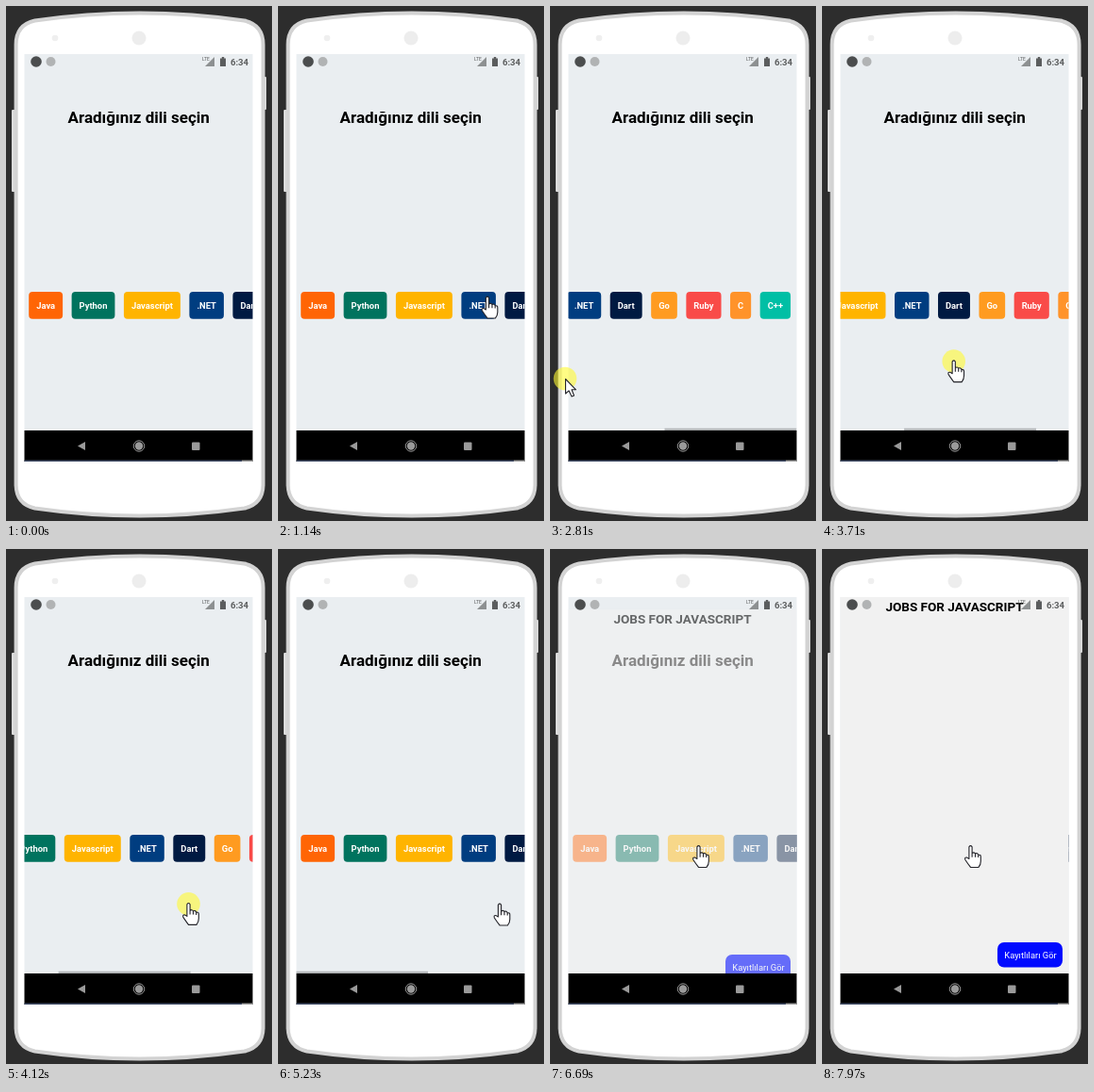
An HTML page for the animation above (8 s loop, 282 by 546 pixels).

```html
<!DOCTYPE html>
<html lang="tr">
<head>
<meta charset="utf-8">
<title>Dil seçimi</title>
<style>
  html, body { margin: 0; width: 100%; height: 100%; overflow: hidden; background: #2d2d2d; }
  svg { display: block; width: 282px; height: 546px; }
  text { font-family: Roboto, sans-serif; text-anchor: middle; }
  .bold { font-weight: 700; }
</style>
</head>
<body>
<svg viewBox="0 0 282 546">
  <defs>
    <clipPath id="app"><rect x="19.500" y="51" width="242" height="399"/></clipPath>
  </defs>

  <rect width="282" height="546" fill="#2d2d2d"/>
  <rect x="6" y="110" width="4" height="87" rx="1" fill="#dcdcdc"/>
  <rect x="272" y="75" width="4" height="35" rx="1" fill="#dcdcdc"/>
  <path transform="translate(.6 -1)" fill="#fff" stroke="#d3d3d3" stroke-width="4"
        d="M10 42Q10 21 30 16.500Q141 .5 252 16.500Q272 21 272 42V508Q272 529 252 533.500Q141 549.500 30 533.500Q10 529 10 508Z"/>
  <circle cx="52" cy="34" r="3.300" fill="#efefef"/>
  <circle cx="141" cy="34" r="7.500" fill="#ededed"/>

  <g clip-path="url(#app)">
    <rect x="19" y="51" width="243" height="399" fill="#eaeef1"/>
    <text class="bold" x="140.700" y="124.300" font-size="17">Aradığınız dili seçin</text>
    <g id="row"></g>
    <rect id="bar" x="19" y="447.700" width="140" height="2.300" fill="#b3b6b8"/>
    <g id="jobs">
      <rect x="19" y="51" width="243" height="440" fill="#f1f1f1"/>
      <text class="bold" x="140.500" y="65.700" font-size="13.500">JOBS FOR JAVASCRIPT</text>
      <rect x="186" y="417" width="69" height="26.500" rx="7" fill="#000aff"/>
      <text x="221" y="434" font-size="9.400" fill="#fff">Kayıtlıları Gör</text>
    </g>
  </g>

  <g fill="#5b5d5e">
    <circle cx="32" cy="59" r="5.800" fill="#4b4d4e"/>
    <circle cx="47.500" cy="59" r="5" fill="#b1b3b4"/>
    <text x="212" y="58" font-size="5">LTE</text>
    <path d="M221 54V64H211Z" fill="#8d9091"/>
    <path d="M227 55.500H228.800V54H231.200V55.500H233V64H227Z"/>
    <text class="bold" x="247.500" y="62.700" font-size="9.600">6:34</text>
  </g>

  <rect x="19.500" y="450" width="242" height="33"/>
  <rect x="19.500" y="481.500" width="230.500" height="1.500" fill="#44506a"/>
  <rect x="250" y="481.500" width="11.500" height="1.500" fill="#a0a0a0"/>
  <g fill="#9a9a9a">
    <path d="M76 466.500L84 462V471Z"/>
    <circle cx="141" cy="466.500" r="4.200"/>
    <circle cx="141" cy="466.500" r="5.700" fill="none" stroke="#9a9a9a"/>
    <rect x="197" y="462.500" width="8.500" height="8.500" rx="1"/>
  </g>

  <g id="cursor" fill="#fff" stroke="#25252b" stroke-linejoin="round">
    <circle id="halo" r="12.300" fill="rgba(255,250,50,.6)" stroke="none"/>
    <path id="hand" transform="translate(0 -.6) scale(.94)" stroke-width="1.200"
          d="M-1.700 1Q0-1.500 1.700 1V8Q4 6.500 5.300 8.500Q8 7.500 8.700 10Q11.500 9.500 11.500 12V17Q11.500 21 9 24H0Q-3 20-6 15.500Q-7 12.500-4 13L-1.700 14.500ZM1.700 8V12.500M5.300 8.500V12.500M8.700 10V13"/>
    <path id="arrow" stroke-width="1.100" d="M.5.500V16L4 12.800L7 19L9.500 18L7 11.800H11.500Z"/>
  </g>
</svg>

<script>
const LOOP = 8000, STEP = 100, MAX_SCROLL = 176.7;
const $ = id => document.getElementById(id);
const [row, bar, jobs, cursor, halo, hand, arrow] =
  ['row', 'bar', 'jobs', 'cursor', 'halo', 'hand', 'arrow'].map($);

const langs = {
  Java: '#ff6505', Python: '#00735e', Javascript: '#ffb400', '.NET': '#003d80',
  Dart: '#001a42', Go: '#ff9b20', Ruby: '#f94b48', C: '#ff932a', 'C++': '#00bfa5'
};
const PAD = 8, GAP = 9.5;
row.innerHTML = Object.entries(langs).map(([name, color]) =>
  `<g><rect y="303" height="28.800" rx="4" fill="${color}"/>
   <text class="bold" y="321" font-size="9.400" fill="#fff">${name}</text></g>`
).join('');

// each button is as wide as its label plus padding
let left = 24.2;
for (const { children: [box, label] } of row.children) {
  const w = label.getComputedTextLength() + 2 * PAD;
  box.setAttribute('x', left);
  box.setAttribute('width', w);
  label.setAttribute('x', left + w / 2);
  left += w + GAP;
}
const picked = row.children[2];

const ramp = (t, from, to) => Math.min(1, Math.max(0, (t - from) / (to - from)));
const glide = u => 1 - (1 - u) ** 1.215;
const smooth = u => u * u * (3 - 2 * u);

// cursor legs: start time, end time, destination
const entry = [121, 508];
const legs = [
  [300, 800, 236, 350], [800, 1100, 222, 309], [1200, 1400, 217, 366],
  [1600, 2000, 126, 388], [2000, 2500, 16, 395], [2800, 3200, 81, 377],
  [3300, 4700, 256, 376], [5100, 5200, 235, 377], [5200, 6000, 160, 314],
  [6400, 6500, 157.5, 315.5]
];
const holds = [[1660, 2880], [3220, 5020], [6110, 6200]];

const cursorAt = t => legs.reduce(([x, y], [from, to, tx, ty]) => {
  const u = glide(ramp(t, from, to));
  return [x + (tx - x) * u, y + (ty - y) * u];
}, entry);

const show = (el, on) => el.setAttribute('visibility', on ? 'visible' : 'hidden');
const move = (el, x, y) => el.setAttribute('transform', `translate(${x} ${y})`);
const fade = (el, v) => el.setAttribute('opacity', v);

function draw(t) {
  const q = Math.floor(t / STEP) * STEP;
  const [x, y] = cursorAt(q);
  const offset = MAX_SCROLL * (smooth(ramp(q, 1850, 2720)) - glide(ramp(q, 3300, 4700)));
  const open = glide(ramp(q, 6400, 6800));

  move(row, -offset, 0);
  move(bar, offset * 0.58, 0);
  fade(bar, ramp(q, 1700, 1800) - ramp(q, 5300, 5500));
  fade(picked, 1 - 0.8 * (ramp(q, 6000, 6200) - ramp(q, 6400, 6500)));
  move(jobs, 0, (1 - open) * 30);
  fade(jobs, open);

  const seen = t >= 340;
  const inside = x > 19 && x < 262 && y > 51 && y < 483;
  move(cursor, x, y);
  show(hand, seen && inside);
  show(arrow, seen && !inside);
  show(halo, holds.some(([from, to]) => t >= from && t < to));
}

const start = performance.now();
function frame(now) {
  draw(Math.max(0, now - start) % LOOP);
  requestAnimationFrame(frame);
}
draw(0);
requestAnimationFrame(frame);
</script>
</body>
</html>
```
